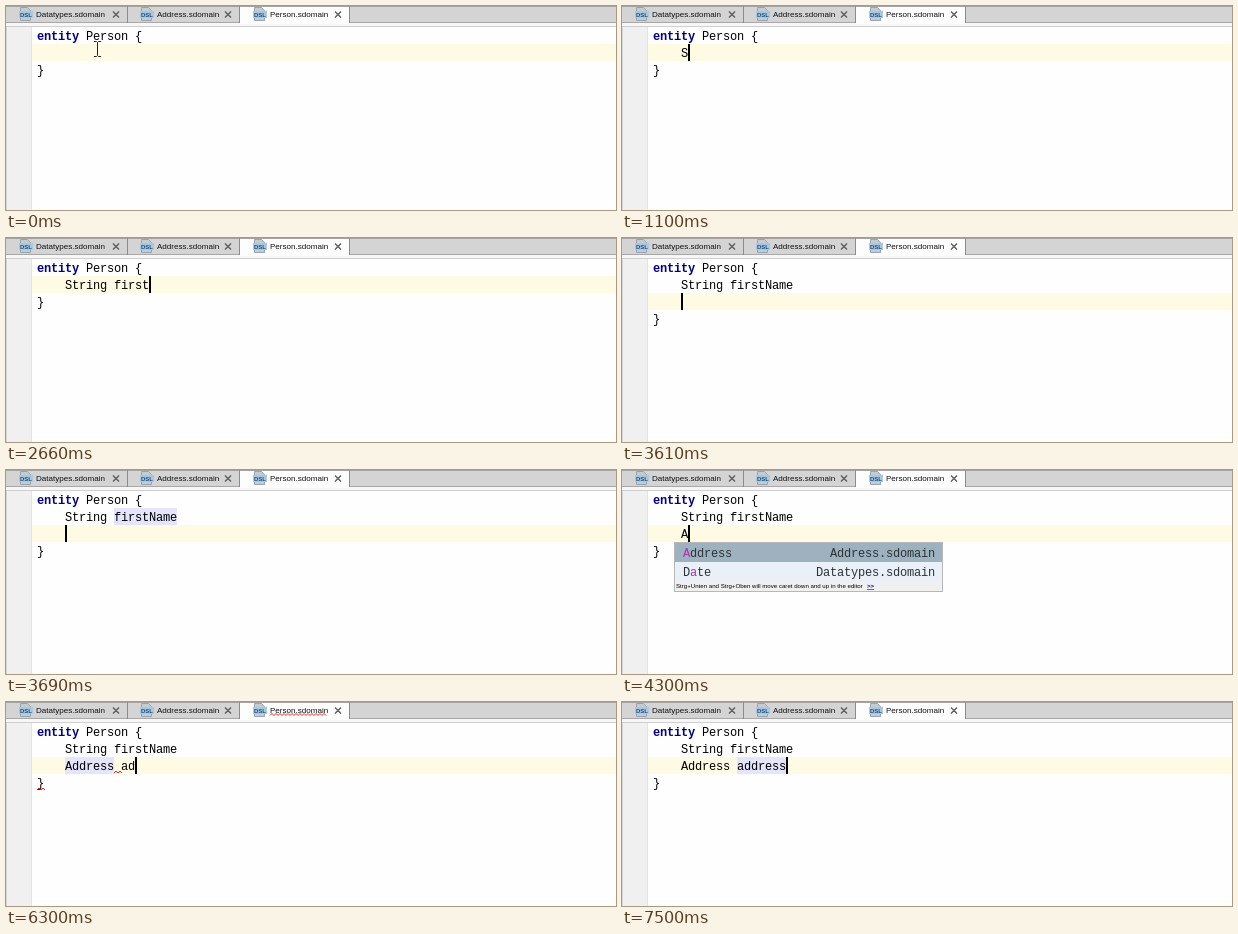
An HTML page that plays this animation: 610 px wide and 204 px high, repeating every 8000 ms.

```html
<!DOCTYPE html>
<html lang="en">
<head>
<meta charset="utf-8">
<title>Code completion</title>
<style>
  html, body { margin: 0; width: 100%; height: 100%; overflow: hidden; background: #fefefe; }
  svg { display: block; width: 610px; height: 204px; }
  text { white-space: pre; }
  .code { font: 12px "Liberation Mono", monospace; letter-spacing: -.2px; }
  .keyword { fill: #000080; font-weight: bold; }
  .tab { font: 8.05px "Liberation Sans", sans-serif; fill: #111; }
  .badge { font: bold 6px "Liberation Sans", sans-serif; fill: #174f86; }
  .hint { font: 6.12px "Liberation Sans", sans-serif; fill: #000; }
  .link { fill: #0000e0; font-weight: bold; text-decoration: underline; }
  .popup .code { fill: #2d3338; }
  .popup .match { fill: #b02cb4; }
  .error { fill: none; stroke: #f02020; stroke-width: 1; }
</style>
</head>
<body>
<svg viewBox="0 0 610 204">
  <rect width="610" height="204" fill="#fefefe"/>
  <rect y="21" width="25" height="183" fill="#f0f0f0"/>
  <rect x="25" y="21" width="1" height="183" fill="#e4e4e4"/>
  <rect y="17" width="1" height="187" fill="#d8d8d8"/>
  <rect width="610" height="17" fill="#d4d4d4"/>
  <rect width="610" height="1" fill="#a4a4a4"/>
  <rect y="16" width="610" height="1" fill="#a8a8a8"/>
  <rect y="17" width="610" height="3" fill="#f7f7f7"/>
  <rect y="20" width="610" height="1" fill="#cfcfcf"/>
  <g id="tabs"></g>
  <rect id="current" x="26" width="584" height="17" fill="#fffae3"/>
  <rect id="usage" height="17" fill="#e4e4fa"/>
  <text class="code" x="31" y="34"><tspan class="keyword">entity</tspan> Person {</text>
  <text id="line1" class="code" x="59" y="51"></text>
  <text id="line2" class="code" x="59" y="68"></text>
  <text id="brace" class="code" x="31">}</text>
  <g id="errors" class="error"></g>
  <g id="popup" class="popup"></g>
  <rect id="caret" width="2" height="17"/>
  <path id="mouse" d="M-3.5-7.5h2.5l1 1 1-1h2.5M0-6.5v13M-3.5 7.5h2.5l1-1 1 1h2.5" fill="none" stroke="#222"/>
</svg>
<script>
const LOOP = 8000, CHAR = 7, ROW = 17, LEFT = 59;
const $ = id => document.getElementById(id);
const set = (el, attrs) => { for (const k in attrs) el.setAttribute(k, attrs[k]); };
const show = (el, on) => set(el, { visibility: on ? 'visible' : 'hidden' });
const between = (t, a, b) => t >= a && t < b;
const rowTop = row => 21 + row * ROW;

const first = {
  text: 'String firstName',
  keys: [1100, 1340, 1460, 1520, 1710, 1810, 1990, 2180, 2300, 2420, 2540, 2660, 2910, 2970, 3160, 3220]
};
// Accepting the completion inserts six characters at once.
const second = {
  text: 'Address address',
  keys: [4060, ...Array(6).fill(5310), 5630, 6120, 6300, 6420, 6590, 6770, 6950, 7070]
};
const typed = (line, t) => line.text.slice(0, line.keys.filter(k => k <= t).length);

function tab(left, right, name, active) {
  const icon = left + 13, close = right - 12;
  return `${active ? `<rect x="${left}" y="1" width="${right - left}" height="17" fill="#fdfdfd"/>` : ''}
    <path d="M${right - .5} 0V17${active ? `M${left - .5} 0V17` : ''}" stroke="#8c8c8c"/>
    <path d="M${icon + 1.5} 1.5h7l3 3v10h-10z" fill="#c3ccd3" stroke="#98a5af"/>
    <rect x="${icon}" y="5" width="14" height="7" fill="#a9c7df"/>
    <text class="badge" x="${icon + 1}" y="11">DSL</text>
    <text class="tab" x="${icon + 17}" y="11">${name}</text>
    <path d="M${close - 3} 5.5l6 6m0-6l-6 6" stroke="#5c5c5c" stroke-width="1.4"/>`;
}

const squiggle = (x, y, width) =>
  `<path d="M${x} ${y}${'l2-2 2 2'.repeat(Math.round(width / 4))}"/>`;

function popup(top, items) {
  const height = items.length * 19 + 12;
  const rows = items.map(([name, file, from, to], i) => {
    const y = top + 1 + i * 19;
    return `<rect x="53" y="${y}" width="267" height="19" fill="${i ? '#e9f0f8' : '#9db2be'}"/>
      <text class="code" x="61" y="${y + 14}">${name.slice(0, from)}<tspan class="match">${
        name.slice(from, to)}</tspan>${name.slice(to)}</text>
      <text class="code" x="${313 - file.length * CHAR}" y="${y + 14}">${file}</text>`;
  });
  const base = top + height - 4;
  return `<rect x="52.5" y="${top + .5}" width="268" height="${height - 1}" fill="#f0f0f0" stroke="#b4b8ba"/>
    ${rows.join('')}
    <text class="hint" x="54" y="${base}">Strg+Unten and Strg+Oben will move caret down and up in the editor</text>
    <text class="hint link" x="245" y="${base}">&gt;&gt;</text>`;
}

function popupAt(t) {
  if (between(t, 1400, 1810))
    return popup(55, [['String', 'Datatypes.sdomain', 0, typed(first, t).length]]);
  if (between(t, 4300, 5310))
    return popup(72, [['Address', 'Address.sdomain', 0, 1], ['Date', 'Datatypes.sdomain', 1, 2]]);
  return '';
}

function usageAt(t) {
  if (between(t, 3690, 4180)) return [1, 7, 9];
  if (between(t, 5690, 7380)) return [2, 0, 7];
  if (t >= 7500) return [2, 8, 7];
  return [1, 0, 0];
}

$('tabs').innerHTML = tab(0, 122, 'Datatypes.sdomain') + tab(121, 234, 'Address.sdomain')
  + tab(234, 344, 'Person.sdomain', true);
$('errors').innerHTML = squiggle(264, 13.5, 57) + squiggle(108, 71, 8) + squiggle(31, 88, 7);

let popupMarkup = '';
function draw(t) {
  const row = t < 3610 ? 1 : 2;
  const line1 = typed(first, t), line2 = typed(second, t);
  $('line1').textContent = line1;
  $('line2').textContent = line2;
  set($('current'), { y: rowTop(row) });
  set($('brace'), { y: rowTop(row + 1) + 13 });

  const [usageRow, start, length] = usageAt(t);
  set($('usage'), { x: LEFT + start * CHAR, y: rowTop(usageRow), width: length * CHAR });

  set($('caret'), { x: LEFT + (row === 1 ? line1 : line2).length * CHAR, y: rowTop(row) });
  show($('caret'), t >= 110 && !between(t, 570, 1100) && !between(t, 5070, 5310));
  show($('errors'), between(t, 5750, 7380));

  const travel = t < 110 ? 0 : t < 190 ? .35 : t < 280 ? .75 : 1;
  set($('mouse'), { transform: `translate(${Math.round(91 + 334 * travel) + .5} ${Math.round(43 + 42 * travel)})` });
  show($('mouse'), t < 360);

  const markup = popupAt(t);
  if (markup !== popupMarkup) $('popup').innerHTML = popupMarkup = markup;
}

const began = performance.now();
function tick() {
  draw((performance.now() - began) % LOOP);
  requestAnimationFrame(tick);
}
tick();
</script>
</body>
</html>
```
